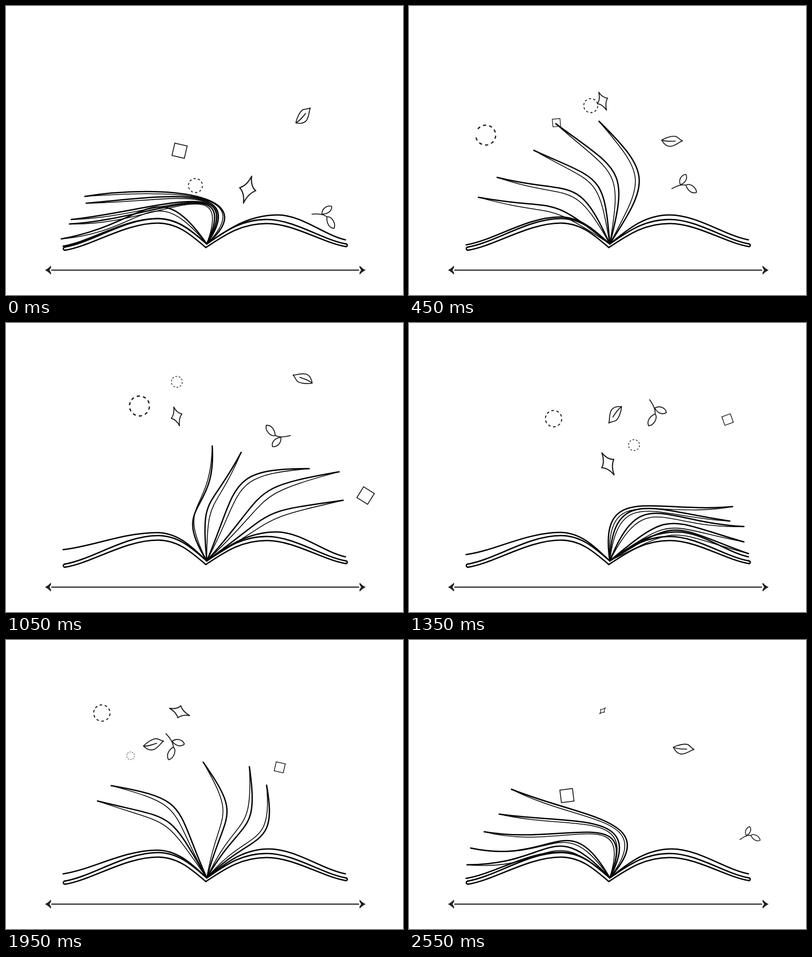
Recreate the animation shown at these times as an HTML page with a canvas. Size 876 px wide and 639 px high, loop 2.7 s.

```html
<!DOCTYPE html>
<html lang="en">
<head>
<meta charset="utf-8">
<title>Open book</title>
<style>
  html, body { margin: 0; width: 100%; height: 100%; overflow: hidden; background: #fff; }
  canvas { display: block; }
</style>
</head>
<body>
<canvas id="stage" width="876" height="639"></canvas>
<script>
const ctx = document.getElementById('stage').getContext('2d');
const LOOP = 2700, STEP = 150;
const TIMES = [0, 300, 750, 1050, 1350, 1950, 2550, LOOP];
const SPINE = [443, 526], RAD = Math.PI / 180;

// Point at a distance and angle (degrees, counterclockwise) from another
const polar = ([x, y], r, deg) => [x + r * Math.cos(deg * RAD), y - r * Math.sin(deg * RAD)];
const clamp = (v, limit) => Math.max(-limit, Math.min(limit, v));

// Monotone cubic interpolation through one row of values per key time
function valuesAt(keys, t) {
  const i = TIMES.findLastIndex((k, n) => k <= t && n < TIMES.length - 1);
  const h = TIMES[i + 1] - TIMES[i], f = (t - TIMES[i]) / h, g = 1 - f;
  const slope = (n, j) => {
    if (n === 0 || n === TIMES.length - 1) return 0;
    const d = (keys[n][j] - keys[n - 1][j]) / (TIMES[n] - TIMES[n - 1]);
    const e = (keys[n + 1][j] - keys[n][j]) / (TIMES[n + 1] - TIMES[n]);
    return d * e <= 0 ? 0 : 2 * d * e / (d + e);
  };
  return keys[i].map((v, j) => v * g * g * (1 + 2 * f) + keys[i + 1][j] * f * f * (3 - 2 * f)
    + h * f * g * (g * slope(i, j) - f * slope(i + 1, j)));
}

const cycle = keys => [...keys, keys[0]];

// Turning pages: tip x, tip y, angle leaving the spine, angle arriving at the tip
const pages = [
  [[174, 421, 40, 189], [328, 285, 60, 168], [607, 278, 45, 48], [744, 392, 36, 8],
   [749, 510, 32, -20], [575, 321, 45, 100], [226, 330, 48, 158]],
  [[177, 436, 55, 185], [240, 310, 78, 170], [531, 264, 63, 62], [735, 329, 48, 10],
   [739, 484, 40, -16], [537, 280, 60, 98], [199, 385, 62, 172]],
  [[144, 472, 60, 186], [223, 362, 95, 170], [417, 270, 92, 107], [669, 322, 67, 0],
   [739, 450, 68, -3], [435, 270, 75, 125], [166, 424, 68, 170]],
  [[140, 482, 65, 183], [167, 411, 115, 172], [280, 320, 110, 150], [519, 286, 95, 62],
   [708, 438, 88, -8], [232, 322, 114, 170], [136, 460, 120, 168]],
  [[122, 515, 125, 190], [139, 453, 145, 172], [205, 354, 128, 166], [455, 272, 122, 94],
   [714, 406, 98, 5], [202, 356, 120, 166], [128, 497, 133, 180]],
].map(keys => cycle(keys.map(([x, y, leave, arrive]) => {
  const dx = x - SPINE[0], dy = SPINE[1] - y;
  return [Math.atan2(dy, dx) / RAD, Math.hypot(dx, dy), leave, arrive];
})));

// Resting sheets: height of the left tip, place of the right crest
const resting = cycle([[531, 600], [530, 572], [520, 588], [501, 597], [512, 592], [517, 580], [527, 580]]);

// Floating shapes: x, y, turn, size
const track = (keys, spin = 0) => {
  const full = keys.map(([x, y, turn = 0, size = 1]) => [x, y, turn, size]);
  const [x, y, turn, size] = full[0];
  return [...full, [x, y, turn + spin, size]];
};
const square = track([[383, 320, 13], [249, 218, -8, .47], [629, 376.5, 10], [793.5, 381.5, 32],
  [703, 213.5, -20, .71], [604, 281.5, 13, .73], [348.5, 344, -7]]);
const star = track([[533, 406, 17], [477, 263, -29, .7], [344, 146.5, -7, .7], [376.5, 206.5, -17, .7],
  [439, 311.5, -29, .9], [383, 159, -70, .76], [427, 156.5, -137, .3]], -180);
const leaf = track([[655.5, 242, -46], [531.5, 302, 12], [720, 267, -52], [654.5, 124, -157],
  [455, 203, -232], [325.5, 229, -374], [606, 239.5, -354]], -360);
const sprig = track([[699.5, 476, 33], [556.5, 425.5, -25], [752, 370, 140, .8], [601, 237.5, 203],
  [530, 198.5, 92], [356, 236, 84], [752.5, 442, 2, .77]]);
const smallRing = track([[418, 397], [459, 177], [235.5, 344], [377, 130, 0, .78],
  [496.5, 270, 0, .78], [275, 256, 0, .55], [300, 300, 0, 0]]);
const bigRing = track([[70, 400], [177, 312.5], [147, 239.5], [294.5, 183.5],
  [319, 211.5, 0, .82], [211.5, 161.5, 0, .82], [160, 200, 0, 0]]);

const squarePath = new Path2D('M-14-14h28v28h-28z');
const starPath = new Path2D('M0-31Q4-9 18-3Q4 8 0 31Q-4 9-18 1Q-4-8 0-31Z');
const leafPath = new Path2D(`M-23 0C-12-7 2-11 9-9C14-7 17-2 23 0C15 3 10 10-2 13
  C-13 14-19 6-23 0C-14 3-4 2 7 1`);
const sprigPath = new Path2D(`M-29 0C-20-7-8-14 2-13M-11-12C-17-22-13-35-2-38C5-29-1-17-11-12Z
  M2-13C10-20 27-12 29 0C18 6 7-3 2-13Z`);
const headPath = new Path2D('M86 584Q94 580 99 574L99.5 578 96 584 99.5 590 99 594Q94 588 86 584Z');

function curve(width, start, ...segments) {
  ctx.lineWidth = width;
  ctx.beginPath();
  ctx.moveTo(...start);
  segments.forEach(s => ctx.bezierCurveTo(...s.flat()));
  ctx.stroke();
}

// Sheet lying on the cover: from its tip over a crest down to the spine
function hill(tip, crest, end = SPINE) {
  const between = (a, b, u, v) => [a[0] + (b[0] - a[0]) * u, a[1] + (b[1] - a[1]) * v];
  curve(3, tip,
    [between(tip, crest, .3, .17), between(tip, crest, .65, 1), crest],
    [between(crest, end, .45, 0), between(crest, end, .74, .58), end]);
}

function cover() {
  const fold = [441, 534];
  hill([130, 533], [335, 470]);
  hill([130, 540], [335, 480], fold);
  hill([750, 526], [575, 472]);
  hill([750, 532], [575, 481], fold);
  ctx.beginPath();
  ctx.arc(130, 536.5, 3.5, Math.PI / 2, -Math.PI / 2);
  ctx.stroke();
  ctx.beginPath();
  ctx.arc(750, 529, 3, -Math.PI / 2, Math.PI / 2);
  ctx.stroke();
}

// The thin back edge is the same curve, bent a little less
function page(keys, t) {
  const [chord, length, leave, arrive] = valuesAt(keys, t);
  const tip = polar(SPINE, length, chord), reach = .6 * length;
  const edge = (width, ease) => {
    const relax = a => a + clamp(chord - a, ease);
    curve(width, SPINE,
      [polar(SPINE, reach, relax(leave)), polar(tip, -reach, relax(arrive)), tip]);
  };
  edge(1.8, 5);
  edge(3, 0);
}

function book(t) {
  ctx.strokeStyle = '#050505';
  cover();
  const [tipY, crestX] = valuesAt(resting, t);
  hill([126, tipY], [333, 470 - 7 * Math.sin(Math.PI * t / LOOP)]);
  hill([749, 517], [crestX, 462]);
  pages.forEach(keys => page(keys, t));
}

// A hop lifts the shape in an arc during one flight between two key times
function place(keys, t, draw, hop) {
  const [x, y, turn, size] = valuesAt(keys, t);
  if (size < .01) return;
  const f = hop ? (t - hop.from) / (hop.to - hop.from) : 0;
  const lift = f > 0 && f < 1 ? hop.height * Math.sin(Math.PI * f) : 0;
  ctx.save();
  ctx.translate(x, y - lift);
  ctx.rotate(turn * RAD);
  ctx.scale(size, size);
  draw(size);
  ctx.restore();
}

// Line width shrinks less than the shape does
const outline = (path, width) => size => {
  ctx.lineWidth = width / Math.sqrt(size);
  ctx.stroke(path);
};

const ring = (radius, width, part = 1) => () => {
  const dash = Math.PI * radius / 10;
  ctx.lineWidth = width;
  ctx.lineCap = 'butt';
  ctx.setLineDash([dash, dash]);
  ctx.beginPath();
  ctx.arc(0, 0, radius, -142 * RAD, (360 * part - 142) * RAD);
  ctx.stroke();
};

function shapes(t) {
  ctx.strokeStyle = '#231f20';
  ctx.lineJoin = 'miter';
  place(square, t, outline(squarePath, 2));
  ctx.lineJoin = 'round';
  place(star, t, outline(starPath, 2.6));
  place(leaf, t, outline(leafPath, 2.1), { from: 1950, to: 2550, height: 135 });
  place(sprig, t, outline(sprigPath, 2.1), { from: 1350, to: 1950, height: 95 });
  place(smallRing, t, ring(15.5, 2));
  if (t) place(bigRing, t, ring(22, 2.8, Math.min(1, t / 500)));
}

function arrow() {
  ctx.strokeStyle = ctx.fillStyle = '#231f20';
  curve(2.6, [101, 584], [[300, 584], [600, 584], [778, 584]]);
  ctx.fill(headPath);
  ctx.save();
  ctx.translate(879.5, 0);
  ctx.scale(-1, 1);
  ctx.fill(headPath);
  ctx.restore();
}

function render(t) {
  ctx.fillStyle = '#fff';
  ctx.fillRect(0, 0, 876, 639);
  ctx.lineCap = ctx.lineJoin = 'round';
  arrow();
  book(t);
  shapes(t);
}

const start = performance.now();
(function loop() {
  const elapsed = performance.now() - start;
  render(Math.floor(elapsed % LOOP / STEP) * STEP);
  requestAnimationFrame(loop);
})();
</script>
</body>
</html>
```
